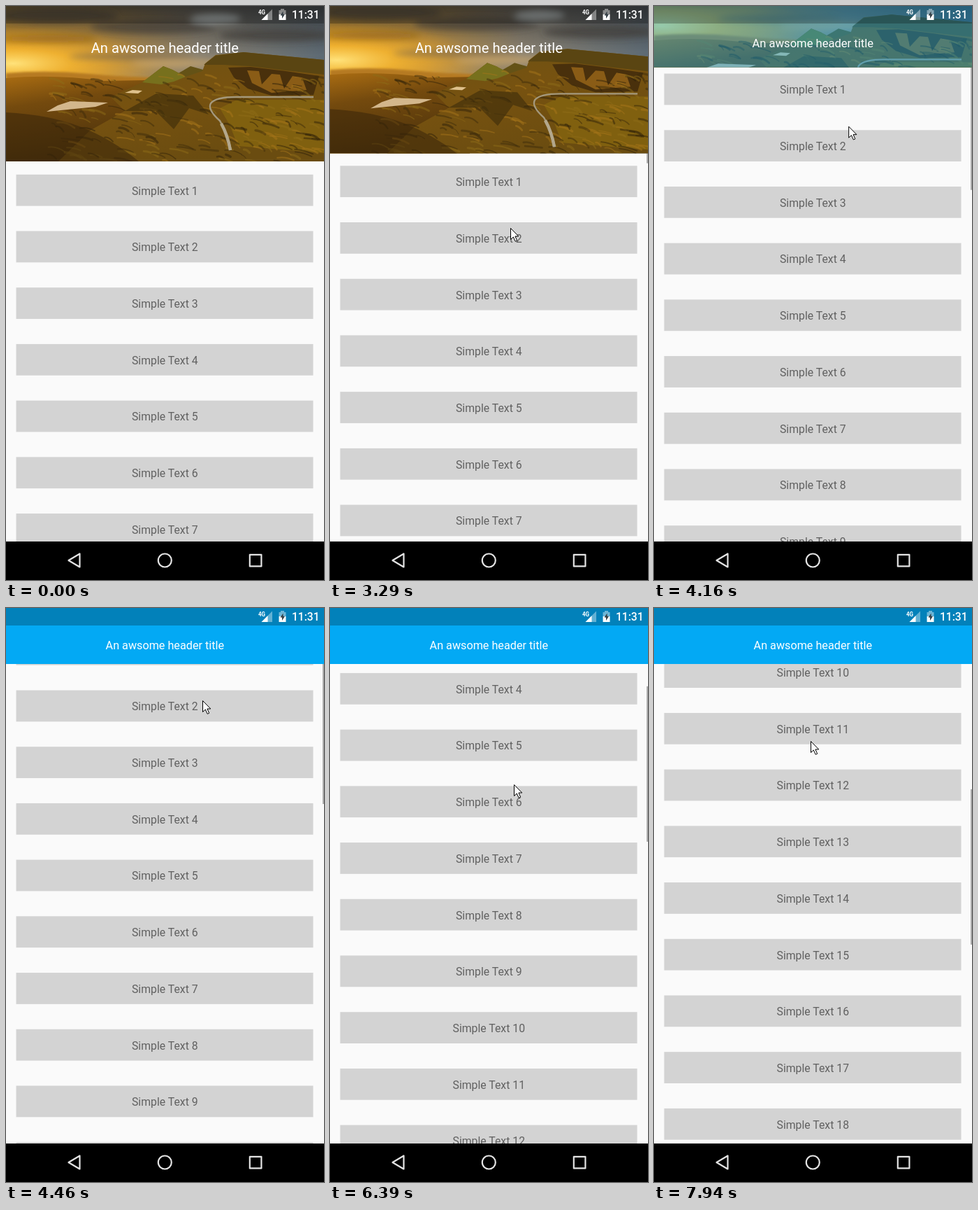
These frames come from a looping animation (455 by 820 pixels, 8 s). An HTML page:

```html
<!DOCTYPE html>
<html lang="en">
<head>
<meta charset="utf-8">
<title>Collapsing header</title>
<style>
  html, body { margin: 0; width: 100%; height: 100%; overflow: hidden; background: #fafafa; }
  body > svg { display: block; width: 100%; height: 100%; }
  text { font-family: Roboto, "Noto Sans", sans-serif; }
  #list rect { fill: #d3d3d3; }
  #list text { font-size: 15.8px; fill: #616161; text-anchor: middle; }
  #title { fill: #fff; text-anchor: middle; }
  .nav { fill: none; stroke: #e4e4e4; stroke-width: 2.2; stroke-linejoin: round; }
</style>
</head>
<body>
<svg viewBox="0 0 455 820">
  <defs>
    <linearGradient id="sky">
      <stop offset="0" stop-color="#e0a02c"/>
      <stop offset=".3" stop-color="#c3933f"/>
      <stop offset=".6" stop-color="#8b8271"/>
      <stop offset="1" stop-color="#5d6a74"/>
    </linearGradient>
    <linearGradient id="dusk" x2="0" y2="1">
      <stop offset="0" stop-color="#2e2f30" stop-opacity=".75"/>
      <stop offset="1" stop-color="#2e2f30" stop-opacity="0"/>
    </linearGradient>
    <radialGradient id="sun">
      <stop offset="0" stop-color="#ffe27a"/>
      <stop offset=".4" stop-color="#f6b62f" stop-opacity=".8"/>
      <stop offset="1" stop-color="#e09a20" stop-opacity="0"/>
    </radialGradient>
    <linearGradient id="plain" x2=".25" y2="1">
      <stop offset="0" stop-color="#a96c12"/>
      <stop offset=".35" stop-color="#744a0e"/>
      <stop offset="1" stop-color="#4a310b"/>
    </linearGradient>
    <linearGradient id="slope" x2=".5" y2="1">
      <stop offset="0" stop-color="#6b5214"/>
      <stop offset=".5" stop-color="#775210"/>
      <stop offset="1" stop-color="#6a4c10"/>
    </linearGradient>
    <filter id="soft" x="-20%" y="-50%" width="140%" height="200%"><feGaussianBlur stdDeviation="5"/></filter>
    <filter id="haze"><feGaussianBlur stdDeviation="1.5"/></filter>
    <clipPath id="land"><path d="M0 102L80 99L160 106L195 108L225 86L255 98L283 86L300 70L340 66L455 77V222H0Z"/></clipPath>
  </defs>

  <rect width="455" height="820" fill="#fafafa"/>
  <g id="list"></g>
  <rect id="bar" x="453" width="2" height="222" fill="#000" fill-opacity=".32"/>

  <svg id="head" width="455" height="222">
    <g id="photo">
      <rect width="455" height="222" fill="url(#sky)"/>
      <rect width="455" height="70" fill="url(#dusk)"/>
      <ellipse cx="10" cy="82" rx="210" ry="52" fill="url(#sun)"/>
      <g filter="url(#soft)" fill="#3f3c38" fill-opacity=".65">
        <ellipse cx="70" cy="14" rx="90" ry="11"/>
        <ellipse cx="210" cy="30" rx="90" ry="10"/>
        <ellipse cx="390" cy="42" rx="85" ry="9"/>
        <ellipse cx="60" cy="47" rx="70" ry="5" fill="#8a5a18"/>
        <ellipse cx="180" cy="72" rx="90" ry="5" fill="#77644a"/>
        <ellipse cx="300" cy="18" rx="36" ry="7" fill="#aab2b4"/>
        <ellipse cx="250" cy="82" rx="70" ry="6" fill="#d0a96a"/>
      </g>
      <path d="M0 96Q60 91 120 97T250 102V130H0Z" fill="#b67a20" filter="url(#haze)"/>
      <path d="M0 103Q70 97 140 107L200 106V222H0Z" fill="url(#plain)"/>
      <path d="M245 97L264 86L282 91L300 105H245Z" fill="#645216"/>
      <path d="M75 222L120 178L170 150L150 130L195 109L225 86L238 91L257 101L281 93L285 82L300 70L340 66L382 70L455 77V222Z" fill="url(#slope)"/>
      <path d="M195 109L225 86L238 91L257 101L240 108L222 112Z" fill="#77701d"/>
      <path d="M283 84L300 71L340 66L382 70L455 77V98L400 92L350 86L310 84Z" fill="#5a4512"/>
      <path d="M318 88L350 87L400 93L448 100L440 127L380 128L346 118L326 102Z" fill="#49300c"/>
      <path d="M345 92L362 93L366 112L380 97L392 98L398 118L410 100L424 103L430 120L380 124L352 110Z" fill="#8a5c16"/>
      <path d="M455 134L330 134L306 146L320 170L332 200L455 210Z" fill="#80600f"/>
      <g id="texture" clip-path="url(#land)" fill="none" stroke-linecap="round"></g>
      <path d="M0 152Q60 155 105 172T190 222H0Z" fill="#39260a" fill-opacity=".55"/>
      <path d="M170 150L215 125L268 128L290 155L262 146L240 176L214 150Z" fill="#3d2c0a" fill-opacity=".6"/>
      <path d="M58 151L74 142L92 136L146 138L128 144L98 147Z" fill="#d3b78c"/>
      <path d="M170 124L181 120L195 121L189 125Z" fill="#dfc18c"/>
      <path d="M322 206Q317 182 306 164Q288 148 293 139Q300 130 330 130T440 130" fill="none" stroke="#a4987c" stroke-width="2.4"/>
      <path d="M321 206Q317 184 308 168" fill="none" stroke="#b3a78c" stroke-width="4.5"/>
    </g>
    <rect id="scrim" width="455" height="222" fill="#03a9f4"/>
    <rect width="455" height="25" fill-opacity=".24"/>
    <text id="title" x="227.3">An awsome header title</text>
  </svg>

  <g fill="#fff">
    <text x="361" y="12" font-size="8.6" font-weight="700" textLength="10" lengthAdjust="spacingAndGlyphs">4G</text>
    <path d="M381 4.500V20H365.500Z" fill-opacity=".38"/>
    <path d="M374.500 11V20H365.500Z"/>
    <path d="M393 4H398V6H400.500V12H390.500V6H393Z" fill-opacity=".42"/>
    <path d="M390.500 12H400.500V20H390.500Z"/>
    <path d="M396.500 7.500L392.500 13.500H395V18L399 11.800H396.500Z" fill="#333e44"/>
    <text x="448.500" y="18.300" font-size="15.6" font-weight="500" text-anchor="end">11:31</text>
  </g>

  <rect y="765" width="455" height="55"/>
  <g class="nav">
    <path d="M105.500 782.500V801.500L89.500 792Z"/>
    <circle cx="227.300" cy="792" r="9.500"/>
    <rect x="348.800" y="783.800" width="16.600" height="16.600"/>
  </g>

  <path id="cursor" d="M.5 .5V16.500L4.300 13L7.200 19.300L9.700 18.200L6.900 12H11.800Z" fill="#fff" stroke="#000"/>
</svg>

<script>
const LOOP = 8000, ROWS = 20, PITCH = 80.71, TOP = 240.8;
const $ = id => document.getElementById(id);
const clamp = v => Math.min(1, Math.max(0, v));

// Bursts of movement: start, end, number of steps
const bursts = [
  [650, 890, 4], [1200, 1350, 3], [1890, 2290, 6], [2520, 3290, 11],
  [3370, 4160, 11], [4230, 4460, 4], [4840, 5390, 8], [5620, 6390, 11],
  [6470, 6700, 4], [6940, 7090, 3], [7250, 7940, 10]
];

// time, x, y of the pointer tip
const pointer = [
  [570, 335, 920], [650, 324, 803], [810, 296, 510], [890, 290, 446],
  [1125, 290, 446], [1275, 266, 212], [1350, 265, 215],
  [1810, 265, 215], [2290, 265, 247], [2443, 265, 247],
  [2820, 256, 350], [3000, 256, 346], [3290, 258, 317], [3930, 270, 257],
  [4240, 281, 142], [4310, 281, 132], [4763, 281, 132], [5310, 263, 396], [5390, 263, 399],
  [5543, 263, 399], [5850, 263, 347], [6160, 263, 252],
  [6863, 263, 252], [7090, 235, 442], [7173, 235, 442], [7600, 224, 190]
];

// time, scroll offset
const scroll = [
  [3050, 0], [3290, 12.5], [3930, 64.5], [4240, 172], [4380, 198], [4460, 204],
  [5620, 204], [5850, 230], [6160, 330], [6390, 390], [6540, 416], [6700, 428],
  [7250, 428], [7400, 515], [7600, 690], [7780, 823], [7940, 898]
];

// time, opacity
const barFade = [[3050, 0], [3130, 1], [4763, 1], [5070, 0], [5543, 0], [5620, 1]];
const scrimFade = [[3960, 0], [4440, 1]];

function at(keys, t, i = 1) {
  const n = keys.findIndex(k => k[0] > t);
  if (n === 0) return keys[0][i];
  if (n < 0) return keys[keys.length - 1][i];
  const a = keys[n - 1], b = keys[n];
  return a[i] + (b[i] - a[i]) * (t - a[0]) / (b[0] - a[0]);
}

// Hold the picture between the steps of a burst
function stepped(t) {
  let held = 0;
  for (const [start, end, steps] of bursts) {
    if (t < start) break;
    const d = (end - start) / (steps - 1);
    held = Math.min(end, start + Math.floor((t - start + 3) / d) * d);
  }
  return held;
}

function buildList() {
  let out = "";
  for (let i = 0; i < ROWS; i++) {
    const y = TOP + i * PITCH;
    out += `<rect x="14.500" y="${y}" width="425" height="44.800"/>` +
      `<text x="227.300" y="${y + 28.8}">Simple Text ${i + 1}</text>`;
  }
  $("list").innerHTML = out;
}

function buildTexture() {
  let seed = 7, out = "";
  const rnd = () => (seed = seed * 16807 % 2147483647) / 2147483647;
  const tones = ["#2e2008", "#a8761a", "#3f2d0b", "#8d6c18"];
  for (let i = 0; i < 240; i++) {
    const x = 60 + rnd() * 400, y = 98 + rnd() * 124, w = 6 + rnd() * 20;
    out += `<path d="M${x} ${y}q${w / 2} ${-2 + rnd() * 3} ${w} ${2 + rnd() * 6}" ` +
      `stroke="${tones[i % 4]}" stroke-width="${1 + rnd() * 2.5}" stroke-opacity=".5"/>`;
  }
  $("texture").innerHTML = out;
}

function draw(now) {
  const t = stepped(now % LOOP);
  const s = at(scroll, t);
  const fold = Math.min(142, s * .93);
  const shrink = clamp((fold - 60) / 82);

  $("list").setAttribute("transform", `translate(0 ${-s})`);
  $("bar").setAttribute("y", s * .2894 - 1);
  $("bar").setAttribute("opacity", at(barFade, t));
  $("head").setAttribute("height", 222 - fold);
  $("photo").setAttribute("transform", `translate(0 ${-fold * .4})`);
  $("scrim").setAttribute("opacity", at(scrimFade, t));
  $("title").setAttribute("font-size", 20.2 - 4 * shrink);
  $("title").setAttribute("y", 67.3 - 8.7 * shrink);
  $("cursor").setAttribute("transform", `translate(${at(pointer, t, 1)} ${at(pointer, t, 2)})`);
}

buildList();
buildTexture();
const begin = performance.now();
function tick() {
  draw(performance.now() - begin);
  requestAnimationFrame(tick);
}
tick();
</script>
</body>
</html>
```
